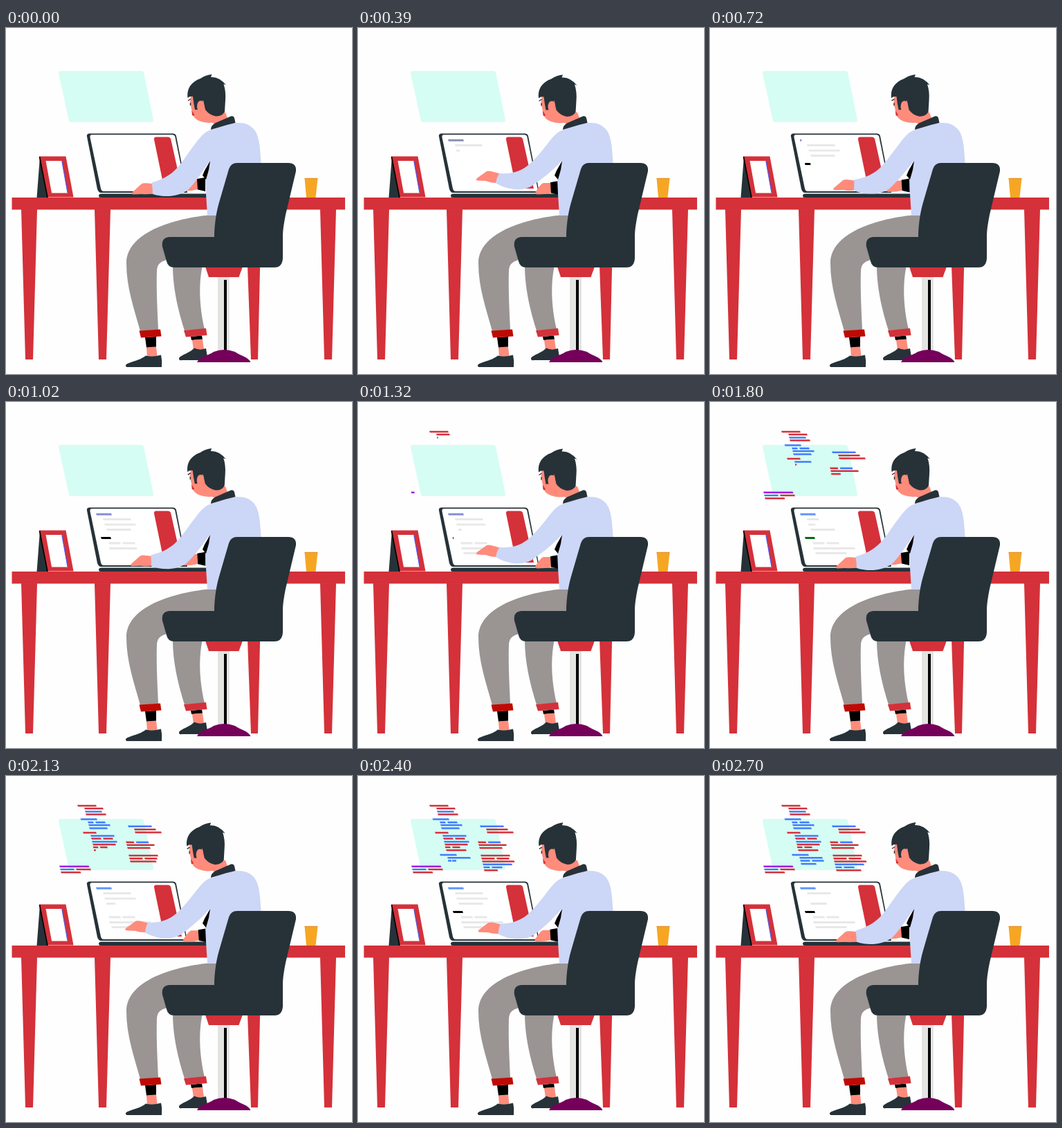
Animation, 500 px wide and 500 px high, one loop 2.73 s. Source, as an HTML page:

```html
<!DOCTYPE html>
<html lang="en">
<head>
<meta charset="utf-8">
<title>Working at a desk</title>
<style>
  html, body { margin: 0; width: 100%; height: 100%; overflow: hidden; background: #fefefe; }
  svg { display: block; width: 100vw; height: 100vh; }
  .red { fill: #d4313a; }
  .dark { fill: #263238; }
  .skin { fill: #ff8b7b; }
  .shirt { fill: #ccd6f6; }
  .grey { fill: #9a9493; }
</style>
</head>
<body>
<svg viewBox="0 0 500 500">
  <path fill="#d5fdf3" d="M79 62H196Q198 62 199 64L213 133Q213 136 211 136H94Q92 136 91 134L76 65Q76 62 79 62Z"/>
  <g id="code"></g>

  <g class="red">
    <path d="M8.500 245H490V262.500H8.500Z"/>
    <path d="M22 262H45L39 479H28ZM128 262H151L145 479H134ZM346 262H369L364 479H354ZM454 262H477L471 479H460Z"/>
  </g>
  <path d="M22 262.500H45M128 262.500H151M454 262.500H477" stroke="#b5474e" stroke-width=".6"/>

  <path class="dark" d="M49 186L44.500 245H60Z"/>
  <path class="red" d="M48 185.500H86.500L97.500 244.500H60Z"/>
  <path fill="#fff" d="M57.500 192H80.500L89 238.500H66Z"/>
  <path d="M48.500 186L60 245" stroke="#000" stroke-width="1.600"/>
  <path d="M81 193L89 238" stroke="#4a5cff" stroke-width="1.200"/>
  <path fill="#f6a623" d="M431.500 217H450.500L447.500 245H434Z"/>
  <path d="M431.500 217.300H450.500" stroke="#d9832a" stroke-width=".7"/>

  <path class="dark" d="M121 152.500H241Q245 152.500 246 156L262 238H137Q134 238 132 233L117 157Q116 152.500 121 152.500Z"/>
  <path fill="#fff" d="M124 154.300H240Q243.500 154.300 244.300 157L260.300 236H141Q138 236 137 232L121.500 158Q121 154.300 124 154.300Z"/>
  <path class="red" d="M214 161Q213.500 157.500 217 157.500H234Q237.500 157.500 238.300 161L254 232H231Q229 232 228 229Z"/>
  <g id="screen"></g>
  <path class="dark" d="M138 239.500H290V245H137Q134 245 134 242.500Q134 239.500 138 239.500Z"/>

  <g id="farHand">
    <path class="skin" d="M280 224L268 224Q265 225 263 228L257 236Q255 240 259 240.500L270 240L280 238Z"/>
    <path d="M278 223L290 221V241L279 238.500Z"/>
  </g>

  <g class="grey">
    <path d="M241 343C241 380 251 415 258 437L287 435C281 410 277 375 284 343Z"/>
    <path d="M304 269.500C250 273 174 293 174 340C174 375 185 405 194 438L220 436C219 410 217 380 218 350C219 341 223 338 232 335L304 320Z"/>
  </g>
  <path d="M201 447L217 446V461L203 462ZM267 446L283 444.500L284 450L268 451Z"/>
  <path class="skin" d="M203 461.500L217 460.500L218.500 474L204 475ZM269 451L284 449.500L286 464L271 465Z"/>
  <path fill="#bf0a04" d="M192.500 437.500L223 435.500L224.500 445.500L195 447.500Z"/>
  <path class="red" d="M257 437L289 434L290.500 444L260 446.500Z"/>
  <path class="dark" d="M250 478C250 473 264 471 272 462.500Q280 466 289 463L291 475L281 480H254Q250 481 250 478Z"/>
  <path class="dark" d="M173 488C173 483 192 482 202 473.500Q212 476 224 472.500Q226 481 225 490H175Q173 490 173 488Z"/>

  <path class="shirt" d="M296 148C320 136 346 131 359 147C367 158 367 175 369 200L345 271H291L289 240L288 217L295 190Z"/>
  <path d="M295 192L287 206L284 213L289 219L293 205Z"/>

  <path fill="#e4e4e2" d="M306 358H323V468H306Z"/>
  <path d="M315 364H319V468H315Z"/>
  <path class="red" d="M288 345H342L336.500 360H293Z"/>
  <path fill="#75005a" d="M276 483C280 474 292 474 300 468Q315 462 331 468C339 474 350 475 353.500 483Z"/>
  <path class="dark" d="M322 204Q325 195 334 195H408Q420 195 419 207L404 270Q400 290 400 300V333Q399 346 388 346H243Q234 346 232 337L226 316Q224 303 236 302H301C301 285 304 265 308 252Z"/>

  <path class="skin" d="M299 120L317 122L320 130L303 139L296 136Z"/>
  <g id="head">
    <path class="skin" d="M267 98L266 108L269.500 124Q271 131 280 134.500Q290 138.500 301 136L317 126L300 100Z"/>
    <path class="dark" d="M262.500 101C261 88 267 78 281 73Q288 68 297.500 67L296 71Q308 70 318 82.500L314.500 81Q318 92 317 104L316 121Q312 128 303 127.500Q294 126 288 118L285 104L277 118H273Q271 108 270 99Q266 98 262.500 101Z"/>
    <path class="skin" d="M276 114Q276 105 282 105Q287 106 286 113L284 119Q280 123 277 119Z"/>
    <path d="M263 105L267 102.500M266.500 108V112" stroke="#263238" stroke-width="1.400"/>
    <path fill="#d4313a" d="M268.300 119L272.500 125.500Q271 127.500 269 126Z"/>
  </g>
  <path class="dark" d="M296 147Q296 141 302 137.500L325 127.500Q329 126.500 330 130L331.500 137Q318 140 306 144Z"/>

  <path id="hand" class="skin"/>
  <path id="sleeve" class="shirt"/>
</svg>
<script>
const LOOP = 2730, STEP = 30;
const $ = id => document.getElementById(id);
const INK = { r: '#d4313a', b: '#407bff', p: '#a01fe0', g: '#e8e8e8', k: '#000' };

// A row is "y x spans"; each span is a colour letter and a width.
function addRow(parent, spec, h = 2.6) {
  const make = (tag, to) => to.appendChild(document.createElementNS('http://www.w3.org/2000/svg', tag));
  const [y, x, ...spans] = spec.split(' ');
  const row = make('g', $(parent));
  let pos = 0;
  for (const s of spans) {
    const w = +s.slice(1), bar = make('path', row);
    bar.setAttribute('d', `M${pos} ${-h / 2}h${w - 1}l1 ${h}h${1 - w}z`);
    bar.setAttribute('fill', INK[s[0]]);
    pos += w + 2;
  }
  return {
    row,
    show(k) {
      row.setAttribute('transform', `translate(${x} ${y}) scale(${k} 1)`);
      row.style.display = k > 0 ? '' : 'none';
    }
  };
}

const clamp = v => Math.max(0, Math.min(1, v));

// Hologram: three columns of code typed at the same time.
const columns = [
  {
    start: i => 1193 + 60 * i + 22 * Math.max(0, i - 10), dur: 95,
    rows: ['43 103 r28', '47 113 r28', '51.5 114 b25', '55.5 115 r30', '62.5 107.5 b24.5',
      '67 118 b9 b15', '71 119 b32', '75.5 120 b27', '82 111 r20', '86.500 122 b35',
      '90.500 123 r15 r15', '95 124 b37', '99 125 r34', '103 125.500 r8.500 r12', '107.300 127 r30',
      '114 118 b25', '118.300 129 b34', '122.500 130 b15 b18', '127 131 b23']
  },
  {
    start: i => 1338 + 85 * i + 13 * Math.max(0, i - 5), dur: 90,
    rows: ['72.700 176 b35', '77.300 185 r32', '81.500 186 r39', '95.700 173 r12.500 b19', '99.700 174 r41',
      '104 175 r34', '115 177 r43', '119.300 178 r20 r19', '123.500 179 r47.500', '127.700 180 b43',
      '132 181 b10 b16', '136.200 182 r37']
  },
  {
    start: i => 1305 + 130 * i, dur: 140,
    rows: ['130.700 77 p43.500', '135 78 b21 r22', '139.300 79 r29.500']
  }
];
columns.forEach(c => { c.bars = c.rows.map(r => addRow('code', r)); });

// Laptop: each row is written, cleared and written again along its own time points.
const screen = [
  ['162.3 130 b23', [60, 0, 210, 1, 660, 1, 690, 0, 705, 0, 850, 1]],
  ['169.500 140 g41', [210, 0, 395, 1, 1710, 1, 1711, 0, 1920, 1, 2610, 1, 2611, 0.4, 2730, 1]],
  ['177.200 142 g46', [370, 0, 540, 1, 1200, 1, 1320, 0.92, 1710, 1, 1711, 0, 2100, 1, 2660, 1, 2661, 0]],
  ['184.500 145 g36', [540, 0, 640, 1, 1290, 1, 1291, 0, 1500, 1, 2060, 1, 2061, 0, 2250, 1, 2610, 1, 2611, 0.3, 2730, 0.8]],
  ['196.500 137 k15', [660, 0, 765, 1, 1290, 1, 1305, 0, 1560, 1, 2070, 1, 2071, 0, 2145, 0, 2280, 1]],
  ['204 148 g18 g19', [780, 0, 920, 1]],
  ['211.500 149 g61', [900, 0, 1080, 1]],
  ['218.500 152 g46', [1060, 0, 1200, 1]]
].map(([spec, keys], i) => ({ bar: addRow('screen', spec, i === 0 || i === 4 ? 3 : 2.8), keys }));

function along(keys, t) {
  if (t <= keys[0]) return keys[1];
  for (let i = 2; i < keys.length; i += 2) {
    if (t <= keys[i]) {
      const k = (t - keys[i - 2]) / (keys[i] - keys[i - 2]);
      return keys[i - 1] + (keys[i + 1] - keys[i - 1]) * k;
    }
  }
  return keys[keys.length - 1];
}

// Arm: blend between the resting and the raised outline.
const poses = {
  hand: [
    'M213 225C204 225 199 223 195 226L183 237Q180 240 184 240.500L196 240Q204 241 214 239Z',
    'M206 211C196 208 191 206 186 207L172 217Q169 220 173 220.500L185 221Q192 224 201 224Z'
  ],
  sleeve: [
    'M298 147C285 149 277 163 264 180C249 202 240 215 210.500 223.500Q212 232 212 240C231 246 250 243 263 234C276 221 285 205 296 190L312 150Z',
    'M298 147C285 149 277 165 262 182C246 200 234 212 204 210Q200 217 199 224C213 233 235 237 250 229C265 219 283 205 296 190L312 150Z'
  ]
};
const NUM = /\d+(\.\d+)?/g;
function blend([a, b], k) {
  const to = b.match(NUM);
  let i = 0;
  return a.replace(NUM, v => (+v + (to[i++] - v) * k).toFixed(2));
}

function raise(t) {
  const cycle = LOOP / 3, peak = 0.45, p = t % cycle / cycle;
  const k = p < peak ? p / peak : (1 - p) / (1 - peak);
  return (1 - Math.cos(Math.PI * k)) / 2;
}

function draw(t) {
  for (const { bars, start, dur } of columns)
    bars.forEach((bar, i) => bar.show(clamp((t - start(i)) / dur)));

  for (const { bar, keys } of screen) bar.show(along(keys, t));
  screen[0].bar.row.firstChild.setAttribute('fill', t < 690 ? '#8890b0' : t < 1500 ? '#8590d8' : '#6096ff');
  screen[4].bar.row.firstChild.setAttribute('fill', t > 1500 && t < 2070 ? '#0a6a1a' : '#000');

  const u = raise(t);
  for (const id in poses) $(id).setAttribute('d', blend(poses[id], u));
  $('farHand').setAttribute('transform', `translate(${2 * u - 2} ${5 * u - 5})`);
  $('head').setAttribute('transform', `translate(${-1.5 * u} ${0.5 * u})`);
}

const began = performance.now();
function tick() {
  const t = (performance.now() - began) % LOOP;
  draw(Math.floor(t / STEP) * STEP);
  requestAnimationFrame(tick);
}
tick();
</script>
</body>
</html>
```
